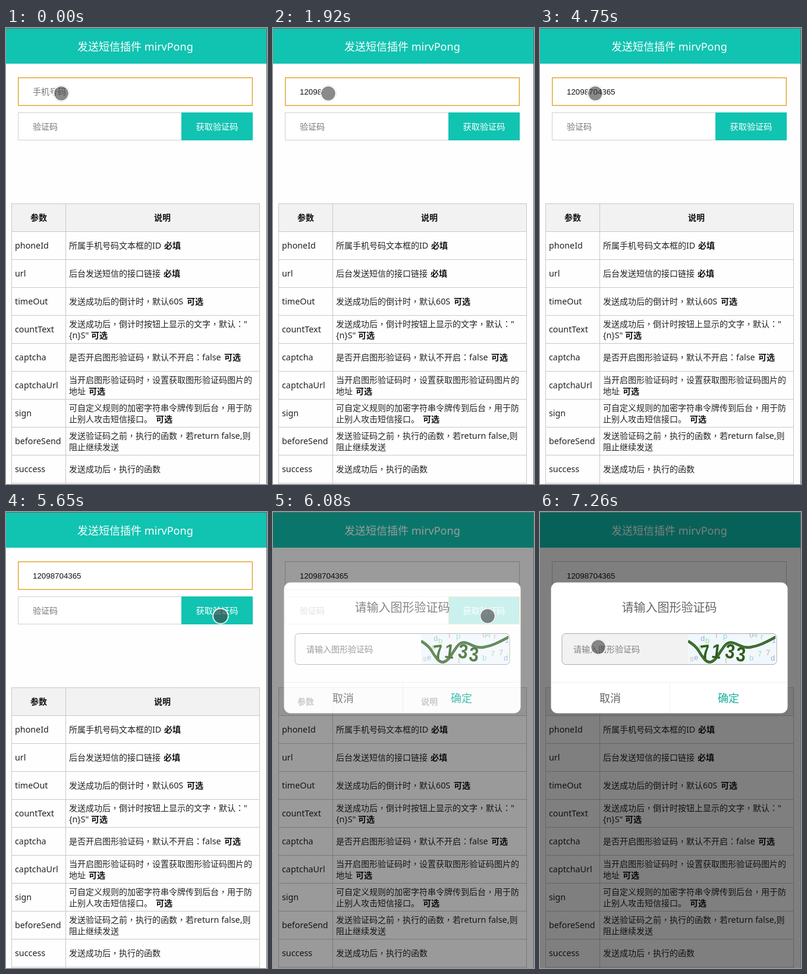
Animation, 439 px wide and 767 px high, one loop 8000 ms. Source, as an HTML page with a canvas:

```html
<!DOCTYPE html>
<html lang="zh-CN">
<head>
<meta charset="utf-8">
<title>短信验证码</title>
<style>
html, body { margin: 0; width: 100%; height: 100%; overflow: hidden; background: #fefefe; }
canvas { display: block; width: 439px; height: 767px; }
</style>
</head>
<body>
<canvas id="stage" width="439" height="767"></canvas>
<script>
const W = 439, H = 767, LOOP = 8000;
const TEAL = '#11c3b1', GOLD = '#dfa01c', LINE = '#c8c8c8';
const PHONE = '12098704365';
const CJK = '"Noto Sans CJK SC", sans-serif';
const CENTERED = '"Noto Sans CJK TC", "Noto Sans CJK SC", sans-serif';
const LATIN = '"Noto Sans", sans-serif';

const stage = document.getElementById('stage').getContext('2d');
const layer = document.createElement('canvas');
layer.width = W;
layer.height = H;
const over = layer.getContext('2d');

// Parameter name, then its lines; "*" separates the bold tag and its x.
const ROWS = [
  ['phoneId', '所属手机号码文本框的ID*必填*266'],
  ['url', '后台发送短信的接口链接*必填*265'],
  ['timeOut', '发送成功后的倒计时，默认60S*可选*304'],
  ['countText', '发送成功后，倒计时按钮上显示的文字，默认："', '{n}S"*可选*143'],
  ['captcha', '是否开启图形验证码，默认不开启：false*可选*367'],
  ['captchaUrl', '当开启图形验证码时，设置获取图形验证码图片的', '地址*可选*139'],
  ['sign', '可自定义规则的加密字符串令牌传到后台，用于防', '止别人攻击短信接口。*可选*252'],
  ['beforeSend', '发送验证码之前，执行的函数，若return false,则', '阻止继续发送'],
  ['success', '发送成功后，执行的函数']
];

// Times at which each digit of the number is entered.
const KEYS = [370, 680, 930, 1360, 1360, 2200, 2870, 3460, 3610, 3760, 4160];
const CARET = [[120, 1920], [2200, 2720], [2870, 3310], [3460, 4750], [5270, 5650]];
const POINTER = [
  [0, 93, 110], [4870, 118, 120], [5020, 188, 160], [5140, 270, 195],
  [5270, 345, 212], [5390, 385, 204], [5510, 361, 176], [5650, 361, 175],
  [6690, 292, 219], [6840, 212, 231], [6960, 151, 229], [7110, 110, 227], [7260, 98, 227]
];
const FADE = [[0, 0], [5930, 0.22], [6080, 0.78], [6230, 1]];

const latest = (steps, t) => steps.filter(s => s[0] <= t).pop();

function fill(c, color, x, y, w, h) {
  c.fillStyle = color;
  c.fillRect(x, y, w, h);
}

function frame(c, color, x, y, w, h) {
  c.strokeStyle = color;
  c.lineWidth = 1;
  c.strokeRect(x + 0.5, y + 0.5, w, h);
}

function round(c, x, y, w, h, r) {
  c.beginPath();
  c.roundRect(x, y, w, h, r);
}

function label(c, str, x, y, size, color, weight = 400, align = 'left') {
  c.font = `${weight} ${size}px ${CJK}`;
  c.textAlign = align;
  c.fillStyle = color;
  c.fillText(str, x, y);
}

// Mixed text: Latin runs, middle-set punctuation and Chinese each use their own face.
function mixed(c, str, x, y, size, latinSize, color) {
  c.textAlign = 'left';
  c.fillStyle = color;
  for (const run of str.match(/[\x20-\x7e]+|[，：]|[^\x20-\x7e，：]+/g)) {
    if (/[\x20-\x7e]/.test(run)) c.font = `${latinSize}px ${LATIN}`;
    else c.font = `${size}px ${/[，：]/.test(run) ? CENTERED : CJK}`;
    c.fillText(run, x, y);
    x += c.measureText(run).width;
  }
}

function drawTable(c) {
  fill(c, '#f2f2f2', 9, 295, 418, 48);
  for (let y = 295; y < H; y += 47) fill(c, LINE, 9, y, 418, 1);
  for (const x of [9, 100, 426]) fill(c, LINE, x, 295, 1, H - 295);
  label(c, '参数', 55, 324, 14, '#111', 700, 'center');
  label(c, '说明', 263, 324, 14, '#111', 700, 'center');
  ROWS.forEach(([name, ...lines], i) => {
    const base = 371 + i * 47;
    mixed(c, name, 15, base, 14, 14.3, '#222');
    lines.forEach((line, k) => {
      const [str, tag, x] = line.split('*');
      const y = lines.length > 1 ? base - 9 + k * 19 : base;
      mixed(c, str, 106, y, 14, 14.3, '#222');
      if (tag) label(c, tag, +x, y, 14, '#111', 700);
    });
  });
}

function drawForm(c, t) {
  const left = t >= 5930;
  const typed = KEYS.filter(k => k <= t).length;
  fill(c, '#fff', 20, 83, 395, 48);
  frame(c, left ? LINE : GOLD, 20, 83, 394, 47);
  if (!left) {
    c.globalAlpha = 0.35;
    frame(c, GOLD, 21, 84, 392, 45);
    c.globalAlpha = 1;
  }
  if (typed) {
    c.font = '13.333px "Liberation Sans", Arial, sans-serif';
    c.textAlign = 'left';
    c.fillStyle = '#111';
    c.fillText(PHONE.slice(0, typed), 45, 112);
  } else {
    label(c, '手机号码', 45, 112, 14, '#777');
  }
  if (CARET.some(([a, b]) => t >= a && t < b)) {
    fill(c, '#222', Math.floor(45 + typed * 7.415), 99, 1, 16);
  }

  fill(c, '#fff', 20, 142, 276, 47);
  frame(c, '#d0d0d0', 20, 142, 276, 46);
  label(c, '验证码', 45, 171, 14, '#777');
  fill(c, TEAL, 295, 142, 120, 47);
  if (left) frame(c, GOLD, 295, 142, 119, 46);
  label(c, '获取验证码', 355, 171, 14.2, '#fff', 500, 'center');
}

function drawCaptcha(c) {
  c.save();
  c.beginPath();
  c.rect(249, 205, 147, 51);
  c.clip();
  fill(c, '#f0f8fd', 249, 205, 147, 51);

  const hues = [215, 110, 20, 170, 35];
  const specks = [['d', 270, 217], ['b', 278, 221], ['t', 295, 211], ['p', 308, 213],
    ['s', 252, 251], ['e', 259, 249], ['u', 267, 231], ['o', 352, 211], ['4', 359, 211],
    ['r', 371, 214], ['1', 390, 220], ['7', 366, 243], ['7', 380, 241], ['b', 352, 250],
    ['t', 311, 254], ['d', 388, 250]];
  c.textAlign = 'left';
  c.font = '13px "Liberation Sans", sans-serif';
  specks.forEach(([ch, x, y], i) => {
    c.fillStyle = `hsl(${hues[i % 5]} 45% 72%)`;
    c.fillText(ch, x, y);
  });

  const path = [[249, 217], [262, 225], [271, 241], [282, 254], [294, 250], [304, 234],
    [314, 220], [325, 219], [344, 229], [364, 226], [382, 218], [397, 210]];
  const trace = () => {
    c.beginPath();
    c.moveTo(...path[0]);
    for (let i = 1; i < path.length - 1; i++) {
      const [x, y] = path[i], [nx, ny] = path[i + 1];
      c.quadraticCurveTo(x, y, (x + nx) / 2, (y + ny) / 2);
    }
    c.lineTo(...path[path.length - 1]);
    c.stroke();
  };
  c.strokeStyle = '#315f20';
  c.lineWidth = 4.5;
  trace();
  c.strokeStyle = '#8aa77f';
  c.lineWidth = 1.5;
  c.setLineDash([1, 2]);
  trace();
  c.setLineDash([]);

  c.font = 'bold 34px "Liberation Sans", sans-serif';
  c.textAlign = 'center';
  c.fillStyle = '#2e5d1d';
  [['7', 278, 235, -0.12], ['1', 297, 234, 0.12], ['3', 320, 234, 0.14], ['3', 338, 239, 0.1]]
    .forEach(([ch, x, y, turn]) => {
      c.save();
      c.translate(x, y);
      c.rotate(turn);
      c.scale(0.85, 1);
      c.fillText(ch, 0, 12);
      c.restore();
    });
  c.restore();
}

function drawDialog(c, t) {
  c.clearRect(0, 0, W, H);
  fill(c, 'rgba(0,0,0,.5)', 0, 0, W, H);
  round(c, 18.5, 118.5, 398, 220, 11);
  c.fillStyle = '#fff';
  c.fill();
  label(c, '请输入图形验证码', 217.5, 168, 20, '#666', 400, 'center');

  round(c, 37, 204.5, 361, 52, 6);
  c.fillStyle = t >= 6230 ? '#f2f2f2' : '#fff';
  c.fill();
  fill(c, '#fff', 396, 208, 2, 45);
  drawCaptcha(c);
  round(c, 37, 204.5, 361, 52, 6);
  c.strokeStyle = '#aaa';
  c.lineWidth = 1;
  c.stroke();
  label(c, '请输入图形验证码', 56, 236, 14, '#808080');

  fill(c, '#eee', 19, 286, 397, 1);
  fill(c, '#eee', 218, 287, 1, 51);
  label(c, '取消', 118, 320, 18, '#666', 400, 'center');
  label(c, '确定', 317, 320, 18, '#13ae9d', 400, 'center');
}

function drawPointer(c, t) {
  const [, x, y] = latest(POINTER, t);
  const ring = (r, width, color) => {
    c.beginPath();
    c.arc(x, y, r, 0, Math.PI * 2);
    c.lineWidth = width;
    c.strokeStyle = color;
    c.stroke();
  };
  c.beginPath();
  c.arc(x, y, 11.5, 0, Math.PI * 2);
  c.fillStyle = 'rgba(60,60,60,.6)';
  c.fill();
  ring(11.5, 0.8, 'rgba(60,60,60,.35)');
  ring(12.9, 1.9, 'rgba(255,255,255,.92)');
  ring(13.6, 0.6, 'rgba(0,0,0,.18)');
}

function draw(t) {
  const c = stage;
  fill(c, '#fefefe', 0, 0, W, H);
  fill(c, TEAL, 0, 0, W, 60);
  mixed(c, '发送短信插件 mirvPong', 120, 37.5, 18, 18, '#fff');
  drawForm(c, t);
  drawTable(c);
  const alpha = latest(FADE, t)[1];
  if (alpha) {
    drawDialog(over, t);
    c.globalAlpha = alpha;
    c.drawImage(layer, 0, 0);
    c.globalAlpha = 1;
  }
  drawPointer(c, t);
  fill(c, '#666', 0, 0, W, 1);
  fill(c, '#666', W - 1, 0, 1, H);
}

const start = performance.now();
function tick() {
  draw((performance.now() - start) % LOOP);
  requestAnimationFrame(tick);
}
tick();
</script>
</body>
</html>
```
